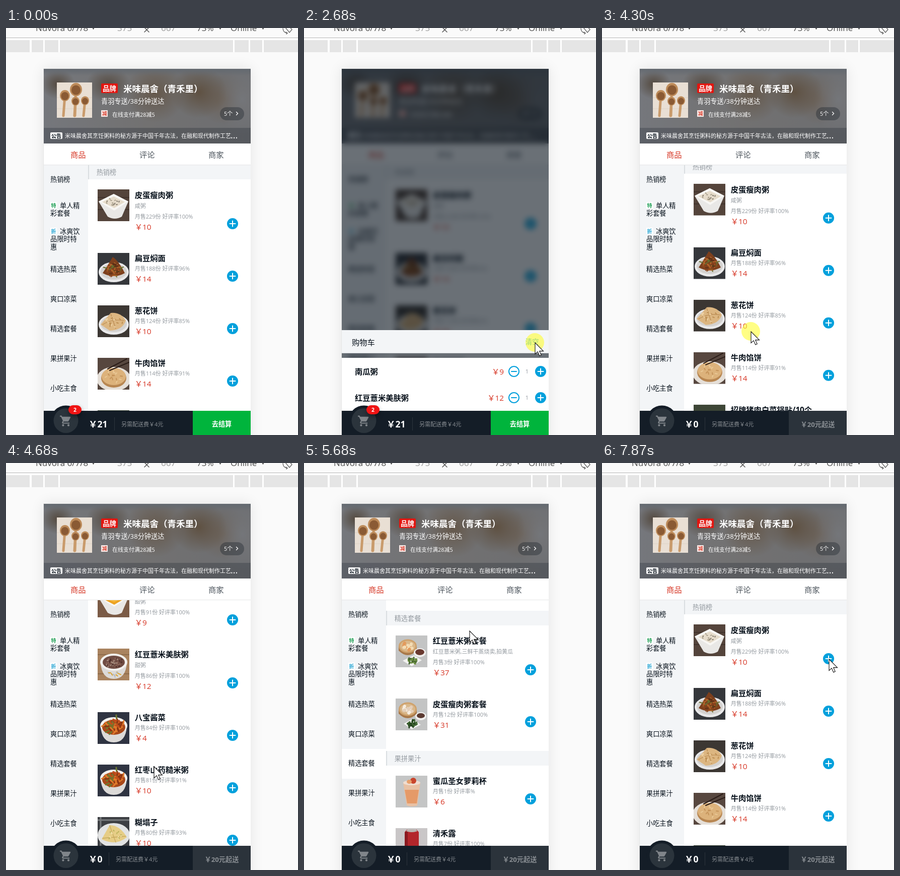
Write an HTML page that moves like this. It is 580x807 px and loops after 8000 ms.

```html
<!DOCTYPE html>
<html lang="zh-CN">
<head>
<meta charset="utf-8">
<title>Takeaway menu</title>
<style>
html, body { margin: 0; width: 580px; height: 807px; overflow: hidden; background: #fafafa; }
#stage { position: relative; width: 580px; height: 807px; overflow: hidden;
  font-family: "Open Sans", "Noto Sans CJK SC", "Noto Sans CJK", sans-serif; color: #07111b; }
#stage div, #stage svg, .t { position: absolute; }
.t { white-space: nowrap; line-height: 20px; margin-top: -10px; }
.b { font-weight: 700; }
.w { color: #fff; }
.g { color: #93999f; }
.dim { color: #898e93; }
.red { color: #d63524; }
.blue { color: #00a0dc; }
.tab { color: #4d555d; }
.right { transform: translateX(-100%); }
.mid { transform: translateX(-50%); }
.tool { color: #4d4d4d; }
.pale { color: #9b9b9b; }
.strike { text-decoration: line-through; }
#ruler { left: 0; top: 19px; width: 580px; height: 29px; background: #fff; border-top: 1.5px solid #b4b4b4; box-sizing: border-box; }
#ruler div { top: 4px; height: 24px; background: #e5e5e5; }
#shade { left: 74px; top: 80px; width: 412px; height: 740px; background: #e6e6e6; box-shadow: 0 0 26px rgba(0,0,0,.09); }
#page { left: 75px; top: 81px; width: 411px; height: 726px; background: #fff; overflow: hidden; }
#head { left: 0; top: 0; width: 411px; height: 147.5px;
  background:
    linear-gradient(#636970, #63697000 14px),
    radial-gradient(ellipse 34px 30px at 28px 30px, #544a40, #544a4000),
    radial-gradient(ellipse 44px 36px at 128px 32px, #564c43, #564c4300),
    radial-gradient(ellipse 60px 58px at 222px 48px, #65584b, #65584b00),
    radial-gradient(ellipse 56px 52px at 308px 46px, #5f5142, #5f514200),
    radial-gradient(ellipse 50px 70px at 395px 60px, #74767a, #74767a00),
    radial-gradient(ellipse 60px 50px at 360px 60px, #6c6259, #6c625900),
    linear-gradient(90deg, #75777c, #727171 50%, #6d6e71); }
#notice { left: 0; top: 117px; width: 411px; height: 30.5px; background: rgba(7,17,27,.22); }
#menu { left: 0; top: 190.6px; width: 87.7px; height: 520px; background: #f3f5f7; }
#menu .row { position: relative; height: 59.2px; display: flex; align-items: center; }
#menu .row span { margin: -1px 0 0 13px; width: 62px; font-size: 13.2px; line-height: 15.3px; }
#menu .row.on { margin-top: -1px; background: #fff; }
#menu i { display: inline-block; width: 13px; height: 13px; margin-right: 6px; background: #fff;
  font: 700 10px/13px "Noto Sans CJK SC", sans-serif; text-align: center; vertical-align: 1px; }
#goods { left: 87.7px; top: 190.6px; width: 323.3px; height: 489px; overflow: hidden; }
#list { left: 0; top: 0; }
.title { left: 0; width: 323px; height: 28.5px; background: #f3f5f7; border-left: 2px solid #d9dde1; box-sizing: border-box; }
.food { left: 19px; width: 63px; height: 63px; }
#tabline { left: 0; top: 190px; width: 411px; height: 1px; background: rgba(7,17,27,.1); }
#mask { left: 75px; top: 81px; width: 411px; height: 679px; background: rgba(7,17,27,.6);
  -webkit-backdrop-filter: blur(6px); backdrop-filter: blur(6px); }
#press { left: -19px; top: -19px; width: 37px; height: 37px; border-radius: 50%; background: rgba(255,253,50,.6); }
</style>
</head>
<body>
<div id="stage"></div>
<script>
const LOOP = 8000;
const stage = document.getElementById('stage');

// Markup helpers
const t = (x, y, size, str, cls = '') =>
  `<span class="t ${cls}" style="left:${x}px;top:${y}px;font-size:${size}px">${str}</span>`;
const box = (x, y, w, h, bg, css = '') =>
  `<div style="left:${x}px;top:${y}px;width:${w}px;height:${h}px;background:${bg};${css}"></div>`;
const svg = (x, y, w, h, body) =>
  `<svg style="left:${x}px;top:${y}px" width="${w}" height="${h}">${body}</svg>`;
const oval = (x, y, rx, ry, fill, extra = '') =>
  `<ellipse cx="${x}" cy="${y}" rx="${rx}" ry="${ry}" fill="${fill}" ${extra}/>`;
const shape = (d, fill) => `<path d="${d}" fill="${fill}"/>`;
const line = (d, color, w) => `<path d="${d}" fill="none" stroke="${color}" stroke-width="${w}" stroke-linecap="round"/>`;
const fill = c => shape('M0 0H63V63H0Z', c);

// Seeded short strokes scattered over an ellipse
function dabs(seed, n, cx, cy, rx, ry, colors, len, w) {
  const rnd = () => (seed = seed * 16807 % 2147483647) / 2147483647;
  let out = '';
  for (let i = 0; i < n; i++) {
    const a = rnd() * 6.283, r = Math.sqrt(rnd()), b = rnd() * 6.283;
    const x = cx + rx * r * Math.cos(a), y = cy + ry * r * Math.sin(a);
    out += line(`M${x.toFixed(1)} ${y.toFixed(1)}l${(len * Math.cos(b)).toFixed(1)} ${(len * Math.sin(b)).toFixed(1)}`,
      colors[i % colors.length], w);
  }
  return out;
}

const squareBowl = inner => shape('M2 24L32 9L61 24L48 54Q34 62 20 54Z', '#e9e8e6') +
  shape('M2 24L32 9L61 24L33 42Z', '#f8f7f4') + inner;
const plate = inner => oval(32, 38, 30, 20, '#e9e9ea') + oval(32, 37, 26, 16, '#d4d2d0') + inner;
const roundBowl = inner => shape('M6 28Q8 60 32 60T58 28Z', '#dcdad8') + oval(32, 27, 27, 17, '#f2f1ee') + inner;
const pickles = ['#c5501c', '#e07b2b', '#8a3512', '#6d7a30'];
const steamer = (x, y, r, c) => shape(`M${x - r} ${y}v9q${r} ${r} ${2 * r} 0v-9z`, '#a9794a') +
  oval(x, y, r, r * .75, '#cfa26c') + oval(x, y, r - 3, r * .75 - 3, '#d9b88c') + dabs(9, 12, x, y, r * .6, r * .4, c, 2, 6);
const glass = (a, b) => fill('#c4c5c5') + shape('M15 14H49L43 59Q32 63 22 59Z', a) + shape('M18 28H46L42 55H23Z', b) +
  oval(32, 14, 17, 5, '#f0ddd0') + oval(35, 10, 6, 6, '#c9452c') + oval(27, 12, 5, 4, '#e7a06c');

const pics = {
  congee: fill('#54443b') + line('M0 16H63M0 40H63', '#42342d', 2) +
    squareBowl(shape('M9 25L32 14L54 25L33 37Z', '#e6dccb') + dabs(5, 14, 31, 25, 14, 7, ['#7d7568', '#a39a86'], 1.5, 2)),
  noodles: fill('#35373b') + plate(shape('M10 40Q20 25 30 8Q42 16 54 40Q32 52 10 40Z', '#7c3f1d') +
    dabs(3, 46, 32, 33, 16, 13, ['#b5652b', '#8a451d', '#5d3016', '#667030'], 7, 2)),
  pancake: fill('#3c3733') + plate(shape('M6 38L26 15Q46 13 56 30Q50 49 24 50Z', '#dcb681') +
    line('M10 38Q30 26 52 30M26 17L36 46', '#b98a52', 1.2) + dabs(7, 16, 32, 33, 18, 12, ['#bd8f54', '#ecd0a3'], 3, 2)),
  pie: fill('#57473f') + oval(32, 42, 34, 24, '#e5dfd8') + oval(32, 40, 25, 19, '#b88752') + oval(32, 37, 24, 17, '#dcb27b') +
    dabs(4, 14, 32, 36, 18, 11, ['#c4935a', '#e9c896'], 4, 2) + line('M20 22L58 2M24 25L62 9', '#2b1d18', 2),
  dumpling: fill('#3d4636') + plate(dabs(8, 14, 32, 36, 18, 10, ['#e3bf84', '#c9954f'], 8, 6)),
  pumpkin: fill('#7b5b46') + squareBowl(shape('M8 25L32 13L55 25L33 38Z', '#eda321') + shape('M14 25L32 17L48 25L33 33Z', '#f6b83b')),
  bean: fill('#a9835f') + line('M0 12H63M0 50H63', '#8f6c4c', 2) +
    roundBowl(oval(32, 27, 22, 13, '#6f4c43') + dabs(6, 40, 32, 27, 18, 10, ['#4f302b', '#8d6659', '#a58a7b'], 1.5, 2.4)) +
    dabs(12, 10, 32, 50, 14, 4, ['#d9a430', '#b9bcc2'], 4, 2),
  pickle: fill('#2f3442') + roundBowl(oval(32, 30, 23, 15, '#a8481a') + dabs(11, 50, 32, 26, 19, 14, pickles, 7, 3)),
  egg: fill('#3d3f43') + line('M0 6H63M6 0V63', '#777a7d', 3) + oval(32, 36, 32, 24, '#e2e3e3') +
    shape('M8 44L24 16Q44 16 58 40Q36 58 8 44Z', '#e6cd86') + line('M24 17L36 50M10 42L56 38', '#c7a95e', 1.3) +
    dabs(14, 16, 33, 36, 16, 10, ['#b8b25a', '#f1e0a8'], 2, 2),
  setA: fill('#c3c4c4') + steamer(24, 21, 18, ['#e39a5c', '#f3dcb4']) + oval(48, 34, 12, 9, '#f1f0ee') + oval(48, 33, 9, 6, '#6a3a30') +
    shape('M14 50L36 39L52 49L32 61Z', '#f2f2f0') + dabs(15, 22, 33, 50, 9, 5, ['#42622f', '#6b8d42'], 4, 3),
  setB: fill('#c3c4c4') + steamer(24, 21, 18, ['#f6ecdf', '#e4cfba']) + oval(50, 35, 11, 8, '#f1f0ee') + oval(50, 34, 8, 5, '#5b3a31') +
    shape('M16 50L34 40L50 52L32 61Z', '#f2f2f0') + dabs(16, 24, 33, 50, 9, 5, ['#24431f', '#3d6330'], 4, 3),
  cup: glass('#e8c1a4', '#e59a68'),
  can: fill('#c9c6c7') + dabs(18, 20, 32, 56, 28, 5, ['#e4e6e8', '#b5b5b8'], 4, 3) + shape('M18 8L22 3H42L46 8V55Q32 62 18 55Z', '#b3262b') +
    shape('M18 8V55L24 57V5Z', '#8a1a20') + oval(32, 5, 11, 3, '#b9b4b0'),
  bottle: fill('#fdfdfd') + shape('M22 10H29V22Q33 26 33 32V56H18V32Q18 26 22 22Z', '#ee8f24') + shape('M21 4H30V10H21Z', '#d97912') +
    shape('M18 36H33V48H18Z', '#f5ad4c') + dabs(20, 8, 42, 54, 8, 3, ['#27421f'], 5, 3) + oval(40, 49, 6, 6, '#f29a1f') + oval(49, 47, 6, 6, '#ee8b14'),
  greens: fill('#403a35') + plate(dabs(21, 36, 32, 35, 18, 11, ['#8fa852', '#d4cf93', '#61803a'], 7, 3)),
  fish: fill('#403a35') + plate(dabs(22, 14, 32, 35, 17, 9, ['#d9962f', '#b87020'], 12, 5))
};

// name, price, sold, rating, picture, description, old price
const hot = [
  ['扁豆焖面', 14, 188, 96, 'noodles'], ['葱花饼', 10, 124, 85, 'pancake'], ['牛肉馅饼', 14, 114, 91, 'pie']
];
const juice = ['VC无限橙果汁', 8, 15, 100, 'bottle', '', 10];
const groups = [
  ['热销榜', [['皮蛋瘦肉粥', 10, 229, 100, 'congee', '咸粥'], ...hot,
    ['招牌猪肉白菜锅贴/10个', 17, 101, 78, 'dumpling'], ['南瓜粥', 9, 91, 100, 'pumpkin', '甜粥'],
    ['红豆薏米美肤粥', 12, 86, 100, 'bean', '甜粥'], ['八宝酱菜', 4, 84, 100, 'pickle'],
    ['红枣山药糙米粥', 10, 81, 91, 'pickle'], ['糊塌子', 10, 80, 93, 'egg']]],
  ['单人精彩套餐', [['红枣山药粥套餐', 29, 17, 100, 'setA', '红枣山药糙米粥,素材包,爽口莴笋丝', 36]], '特', '#1f9e55'],
  ['冰爽饮品限时特惠', [juice], '折', '#1a9fd0'],
  ['精选热菜', [['娃娃菜炖豆腐', 17, 43, 92, 'greens'], ['手撕包菜', 16, 29, 100, 'greens'], ['香酥黄金鱼/3条', 11, 15, 100, 'fish']]],
  ['爽口凉菜', [['八宝酱菜', 4, 84, 100, 'pickle'], ['拍黄瓜', 9, 28, 100, 'greens']]],
  ['精选套餐', [['红豆薏米粥套餐', 37, 3, 100, 'setA', '红豆薏米粥,三鲜干蒸烧卖,拍黄瓜'], ['皮蛋瘦肉粥套餐', 31, 12, 100, 'setB']]],
  ['果拼果汁', [['蜜瓜圣女萝莉杯', 6, 1, '', 'cup'], ['清禾露', 6, 7, 100, 'can'], juice]],
  ['小吃主食', hot]
];

const plus = (x, y) => svg(x - 12, y - 12, 24, 24, oval(12, 12, 11, 11, '#00a0dc') + line('M6.5 12H17.5M12 6.5V17.5', '#fff', 2));
const minus = (x, y) => svg(x - 12, y - 12, 24, 24, oval(12, 12, 10, 10, '#fff', 'stroke="#00a0dc" stroke-width="2"') + line('M7 12H17', '#00a0dc', 2));

function foodHtml([name, price, sold, rate, pic, desc, old], y) {
  const d = desc ? 22 : 0, x = 93;
  return `<div class="food" style="top:${y}px">${svg(0, 0, 63, 63, pics[pic])}</div>` +
    t(x, y + 10.5, 15.3, name, 'b') + (desc ? t(x, y + 32.5, 11, desc, 'g') : '') +
    t(x, y + 31.5 + d, 11, `月售${sold}份 好评率${rate}%`, 'g') +
    t(x, y + 51.5 + d, 15.3, '￥' + price, 'red') +
    (old ? t(x + 37, y + 52.5 + d, 11, '￥' + old, 'g strike') : '') + plus(287, y + 46 + d);
}

const heads = [];
let listHtml = '', offset = 0;
for (const [name, foods] of groups) {
  heads.push(offset);
  listHtml += `<div class="title" style="top:${offset}px"></div>` + t(17, offset + 14.5, 13.2, name, 'g');
  offset += 48.5;
  for (const f of foods) {
    listHtml += foodHtml(f, offset);
    offset += f[5] ? 125.5 : 104;
  }
}

const menuHtml = groups.map(([name, , tag, color]) =>
  `<div class="row"><span>${tag ? `<i style="color:${color}">${tag}</i>` : ''}${name}</span></div>`).join('');

const spoon = (x, y, r, tx, ty) => line(`M${x} ${y}L${tx} ${ty}`, '#c99b6c', 5) +
  oval(x, y, r, r * 1.1, '#bd8b5a') + oval(x, y + 1, r * .75, r * .8, '#8a5a34');
const avatar = shape('M0 0H70V70H0Z', '#e9dfd4') + line('M0 30H70M0 52H70', '#ded2c5', 1) +
  spoon(38, 14, 12, 35, 66) + spoon(16, 26, 10, 13, 66) + spoon(37, 37, 8, 36, 66) + spoon(56, 36, 8, 53, 66);

const toolbar =
  t(59, 0, 17, 'Nuvora 6/7/8', 'tool') + t(169, 0, 9, '▼', 'tool') + t(221, 0, 17, '375', 'tool pale') +
  t(308, 0, 17, '667', 'tool pale') + t(379, 0, 17, '73%', 'tool') + t(421, 0, 9, '▼', 'tool') +
  t(446, 0, 17, 'Online', 'tool') + t(506, 0, 9, '▼', 'tool') +
  svg(272, -4, 14, 16, line('M3 3L12 12M12 3L3 12', '#4d4d4d', 1.4)) +
  svg(546, -8, 28, 22, line('M8 6L14 2L22 11L17 17Z M4 9Q5 18 13 18M10 16L13 18L11 20', '#666', 1.4));
const stops = [0, 47, 51, 74, 77, 104, 107, 451, 454, 482, 485, 509, 512, 580];
let ruler = '';
for (let i = 0; i < stops.length; i += 2)
  ruler += `<div style="left:${stops[i]}px;width:${stops[i + 1] - stops[i]}px"></div>`;

const head = `<div id="head"><div id="notice"></div>
  ${svg(26, 26.5, 70, 70, avatar)}
  ${box(113.5, 28.5, 33.5, 19.5, '#e3150f', 'border-radius:2px')}${t(117, 38.5, 13.5, '品牌', 'b w')}
  ${t(158, 38.5, 17.5, '米味晨舍（青禾里）', 'b w')}
  ${t(114, 64, 13.2, '青羽专送/38分钟送达', 'w')}
  ${box(114, 82, 13, 13, '#fbe9e6')}${t(116, 88.5, 9.5, '减', 'b red')}
  ${t(136, 90.5, 11, '在线支付满28减5', 'w')}
  ${box(350, 76, 48, 26, 'rgba(7,17,27,.3)', 'border-radius:13px')}${t(358, 89, 11, '5个', 'w')}
  ${svg(380, 83, 9, 11, line('M2.5 2.5L5.5 5.5L2.5 8.5', '#fff', 1.3))}
  ${box(13, 126, 24, 12.5, '#fff', 'border-radius:2px')}${t(15, 132.5, 10, '公告', 'b')}
  ${t(42, 133, 11, '米味晨舍其烹饪粥料的秘方源于中国千年古法，在融和现代制作工艺', 'w')}${t(371, 131, 18, '...', 'w')}
</div>`;

const cartPath = 'M1 2v2h2l3.6 7.6-1.4 2.4c-.8 1.4.2 3 1.8 3h12v-2H7.4l-.2-.4.9-1.6h7.5c.7 0 1.4-.4 1.7-1l3.6-6.5A1 1 0 0 0 20 4H5.2l-.9-2z';
const bar = box(75, 759, 411, 48, '#141d27') +
  svg(88, 748, 62, 60, oval(31, 31, 30.5, 30.5, '#141d27') + oval(31, 30.5, 24.5, 24.5, '#2b343c') +
    `<g transform="translate(18 18.5) scale(1.06)" fill="#80858a"><path d="${cartPath}"/><circle cx="7" cy="20" r="2"/><circle cx="17" cy="20" r="2"/></g>`) +
  `<div id="full">${box(123.5, 748, 26.5, 17.5, '#f01414', 'border-radius:9px;box-shadow:0 4px 8px rgba(0,0,0,.4)')}
    ${t(137, 757, 10.5, '2', 'b w mid')}${t(164, 785, 17.5, '￥21', 'b w')}${box(215, 772, 1, 26, '#2c343d')}
    ${t(229, 786, 11, '另需配送费￥4元', 'dim')}${box(371, 759, 115, 48, '#00b43c')}${t(428.5, 785, 13.2, '去结算', 'b w mid')}</div>
  <div id="empty">${t(164, 785, 17.5, '￥0', 'b w')}${box(204, 772, 1, 26, '#2c343d')}
    ${t(218, 786, 11, '另需配送费￥4元', 'dim')}${box(371, 759, 115, 48, '#2b333b')}${t(428.5, 785.5, 13.2, '￥20元起送', 'b dim mid')}</div>`;

const cartRow = (name, price, y) => t(101, y, 15.3, name, 'b') + t(397, y, 15.3, '￥' + price, 'red right') +
  minus(417, y - .5) + t(443, y - .5, 11, '1', 'g mid') + plus(469.5, y - .5);
const cart = `<div id="cart"><div id="mask"></div>${box(75, 599, 411, 45, '#f3f5f7', 'border-bottom:1px solid #d5d8db')}
  ${t(95, 623, 15.3, '购物车')}${t(440, 621.5, 13.2, '清空', 'blue')}${box(75, 654, 411, 106, '#fff')}
  ${cartRow('南瓜粥', 9, 681)}${cartRow('红豆薏米美肤粥', 12, 733)}</div>`;

stage.innerHTML = `${toolbar}<div id="ruler">${ruler}</div><div id="shade"></div>
  <div id="page">${head}
    <div id="menu">${menuHtml}</div>
    <div id="goods"><div id="list">${listHtml}</div></div>
    ${t(53, 170, 15.3, '商品', 'red')}${t(190, 170, 15.3, '评论', 'tab')}${t(327, 170, 15.3, '商家', 'tab')}
    <div id="tabline"></div></div>
  ${cart}${bar}
  <div id="cursor"><div id="press"></div>
  ${svg(-1, -1, 21, 29, '<path d="M1 1V23.5L6.2 18.8L9.8 27L13.2 25.5L9.7 17.6H17.5Z" fill="#fff" stroke="#111" stroke-width="1.1"/>')}</div>`;

const $ = id => document.getElementById(id);

const bursts = [[580, 1290, 10], [1440, 1440, 1], [1840, 2370, 8], [2600, 3380, 11], [3460, 4220, 11], [4300, 5070, 11],
  [5150, 5920, 11], [6000, 6790, 11], [6860, 7410, 8], [7580, 7870, 5]];
function snap(now) {
  let q = 0;
  for (const [a, b, n] of bursts) {
    if (now < a) break;
    const d = n > 1 ? (b - a) / (n - 1) : 1;
    q = a + d * Math.min(n - 1, Math.floor((now - a) / d + .2));
  }
  return q;
}

const pointer = [[580, 376, 793], [900, 250, 778], [1211, 118, 753], [1290, 111, 751], [1770, 111, 751], [2290, 455, 618],
  [2370, 459, 624], [2750, 459, 624], [3380, 297, 434], [3460, 297, 440], [3764, 297, 560], [3840, 297, 602], [4300, 296, 602],
  [4460, 298, 430], [4685, 294, 602], [5070, 298, 600], [5150, 300, 590], [5310, 320, 380], [5689, 329, 333], [6150, 325, 335],
  [6632, 139, 317], [6790, 114, 303], [7020, 114, 303], [7410, 380, 304], [7580, 392, 330], [7725, 440, 407], [7797, 449, 400], [7870, 451, 389]];
const scroll = [[3440, 0], [3764, -42], [3840, -55], [3920, -30], [4000, -14], [4100, -4], [4220, 0], [4290, 0], [4460, 190],
  [4560, 410], [4685, 619], [4850, 800], [5070, 910], [5150, 950], [5310, 1250], [5460, 1680], [5580, 1920], [5689, 2075],
  [5800, 2153], [5920, 2208], [6150, 2263], [6400, 2300], [6632, 2318], [6790, 2321], [6930, 2321], [7020, 1180], [7100, 580],
  [7180, 260], [7260, 90], [7340, 15], [7410, 0]];
const presses = [[1280, 1440], [2600, 2750], [3460, 3900], [4300, 4500], [5150, 5350], [6860, 6930]];

function track(keys, at, col) {
  const i = keys.findIndex(k => k[0] > at);
  if (i === 0) return keys[0][col];
  if (i < 0) return keys[keys.length - 1][col];
  const a = keys[i - 1], b = keys[i];
  return a[col] + (b[col] - a[col]) * (at - a[0]) / (b[0] - a[0]);
}
const show = (el, on) => el.style.visibility = on ? 'visible' : 'hidden';
const rows = [...document.querySelectorAll('#menu .row')];

function draw() {
  const now = performance.now() % LOOP, q = snap(now);
  const y = track(scroll, q, 1);
  $('list').style.transform = `translateY(${-y}px)`;
  const active = heads.filter(h => y >= h - 60).length - 1;
  rows.forEach((r, i) => r.classList.toggle('on', i > 0 && i === active));
  $('cart').style.display = q >= 1440 && q < 2750 ? 'block' : 'none';
  show($('full'), q < 2750);
  show($('empty'), q >= 2750);
  $('cursor').style.display = q >= 580 ? 'block' : 'none';
  $('cursor').style.transform = `translate(${track(pointer, q, 1)}px, ${track(pointer, q, 2)}px)`;
  $('press').style.display = presses.some(([a, b]) => q >= a && q < b) ? 'block' : 'none';
  requestAnimationFrame(draw);
}
draw();
</script>
</body>
</html>
```
